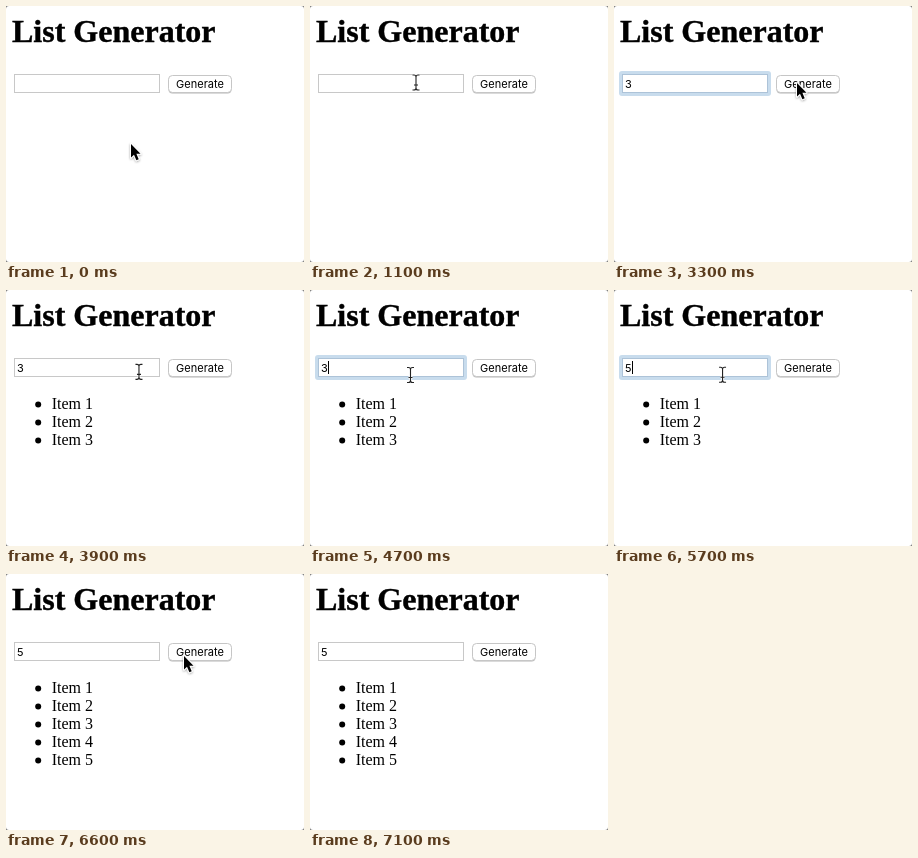
Recreate the animation shown at these times as an HTML page. Size 298x256 px, loop 7.3 s.

```html
<!DOCTYPE html>
<html lang="en">
<head>
<meta charset="utf-8">
<title>List Generator</title>
<style>
  html, body { margin: 0; width: 100%; height: 100%; overflow: hidden; background: #777; }
  svg { display: block; width: 298px; height: 256px; }
  .serif { font: 16px "Liberation Serif", Times, serif; }
  .title { font-size: 32px; font-weight: bold; stroke: #000; stroke-width: .4; }
  .ui { font: 11px Inter, sans-serif; }
  .halo { paint-order: stroke; stroke: #fff; stroke-width: 2; stroke-linejoin: round; }
</style>
</head>
<body>
<svg viewBox="0 0 298 256">
  <defs>
    <linearGradient id="blue" x2="0" y2="1">
      <stop stop-color="#6bb0f9"/>
      <stop offset="1" stop-color="#1168f6"/>
    </linearGradient>
    <filter id="shadow" x="-50%" y="-50%" width="200%" height="200%">
      <feDropShadow dx="0" dy="1" stdDeviation="1" flood-opacity=".35"/>
    </filter>
    <path id="stem" d="M-3.5 -7.5H-2Q0 -7.5 0 -5.5Q0 -7.5 2 -7.5H3.5M0 -5.5V5.5M-3.5 7.5H-2Q0 7.5 0 5.5Q0 7.5 2 7.5H3.5M-2 2.5H2"/>
  </defs>

  <rect width="298" height="256" rx="3" fill="#fff"/>
  <text class="serif title" x="6" y="36">List Generator</text>

  <rect x="8.5" y="68.5" width="145" height="18" fill="#fff" stroke="#c8c8c8"/>
  <g id="ring">
    <rect x="5" y="65" width="152" height="25" rx="3" fill="#c8dced"/>
    <rect x="8.5" y="68.5" width="145" height="18" fill="#fff" stroke="#adc3d8"/>
  </g>
  <text class="ui" id="value" x="11" y="82"></text>
  <rect id="caret" y="71" width="1" height="13"/>

  <rect x="162.5" y="70" width="63" height="17.5" rx="4" fill="#b5b5b5"/>
  <rect id="button" x="162.5" y="69.5" width="63" height="17" rx="4" fill="#fff" stroke="#c6c6c6"/>
  <text class="ui" id="label" x="194" y="82" text-anchor="middle">Generate</text>

  <g id="list" class="serif"></g>

  <g id="arrow" filter="url(#shadow)">
    <path class="halo" d="M0 0V13.5L3 10.7L5.4 16.2L7.7 15.2L5.4 9.8H9.5Z"/>
  </g>
  <g id="beam" fill="none">
    <use href="#stem" stroke="#fff" stroke-width="2.6"/>
    <use href="#stem" stroke="#222" stroke-width="1.1"/>
  </g>
</svg>
<script>
  const LOOP = 7300, TICK = 100;
  const $ = id => document.getElementById(id);
  const show = (el, on) => el.setAttribute('visibility', on ? 'visible' : 'hidden');
  const within = (t, a, b) => t >= a && t < b;

  // Pointer moves: start, end, target x, target y
  const home = [125, 138];
  const moves = [
    [0, 300, 106, 76.5],
    [2500, 3100, 183, 77],
    [3500, 4200, 100.5, 85],
    [5600, 6100, 178, 82],
    [6600, 7100, 170, 278]
  ];

  // Spans in which the field has focus
  const focus = [[1200, 3400], [4400, 6500]];
  const edits = [[2400, '3'], [5200, ''], [5500, '5']];
  const lists = [[3500, 3], [6600, 5]];
  const presses = [3400, 6500];

  const latest = (steps, t, start) =>
    steps.reduce((v, [at, next]) => t >= at ? next : v, start);

  function pointer(t) {
    let [x, y] = home;
    for (const [a, b, tx, ty] of moves) {
      const p = Math.min(1, Math.max(0, (t - a) / (b - a)));
      const e = p * p * (3 - 2 * p);
      x += (tx - x) * e;
      y += (ty - y) * e;
    }
    return [x, y];
  }

  const items = Array.from({ length: 5 }, (_, i) => {
    const y = 119 + 18 * i;
    $('list').insertAdjacentHTML('beforeend',
      `<g><circle cx="32.2" cy="${y - 4.5}" r="3"/><text x="45.7" y="${y}">Item ${i + 1}</text></g>`);
    return $('list').lastElementChild;
  });

  function draw(t) {
    const value = latest(edits, t, '');
    $('value').textContent = value;

    // The caret blinks, turning solid on each focus or edit
    const field = focus.find(([a, b]) => within(t, a, b));
    show($('ring'), field);
    const starts = [...focus, ...edits].map(s => s[0]).filter(s => s <= t);
    show($('caret'), field && (t - Math.max(...starts)) % 1000 < 500);
    $('caret').setAttribute('x', value ? 18 : 11);

    const pressed = presses.some(p => within(t, p, p + TICK));
    $('button').setAttribute('fill', pressed ? 'url(#blue)' : '#fff');
    $('label').setAttribute('fill', pressed ? '#fff' : '#000');

    const count = latest(lists, t, 0);
    items.forEach((item, i) => show(item, i < count));

    const [x, y] = pointer(t);
    const typing = within(t, 2400, 2600) || within(t, 5200, 5700);
    const overField = within(x, 8, 154) && within(y, 68, 87);
    for (const id of ['arrow', 'beam']) {
      $(id).setAttribute('transform', `translate(${x} ${y})`);
      show($(id), !typing && overField === (id === 'beam'));
    }
  }

  const start = performance.now();
  function frame() {
    const t = (performance.now() - start) % LOOP;
    draw(Math.floor(t / TICK) * TICK);
    requestAnimationFrame(frame);
  }
  frame();
</script>
</body>
</html>
```
